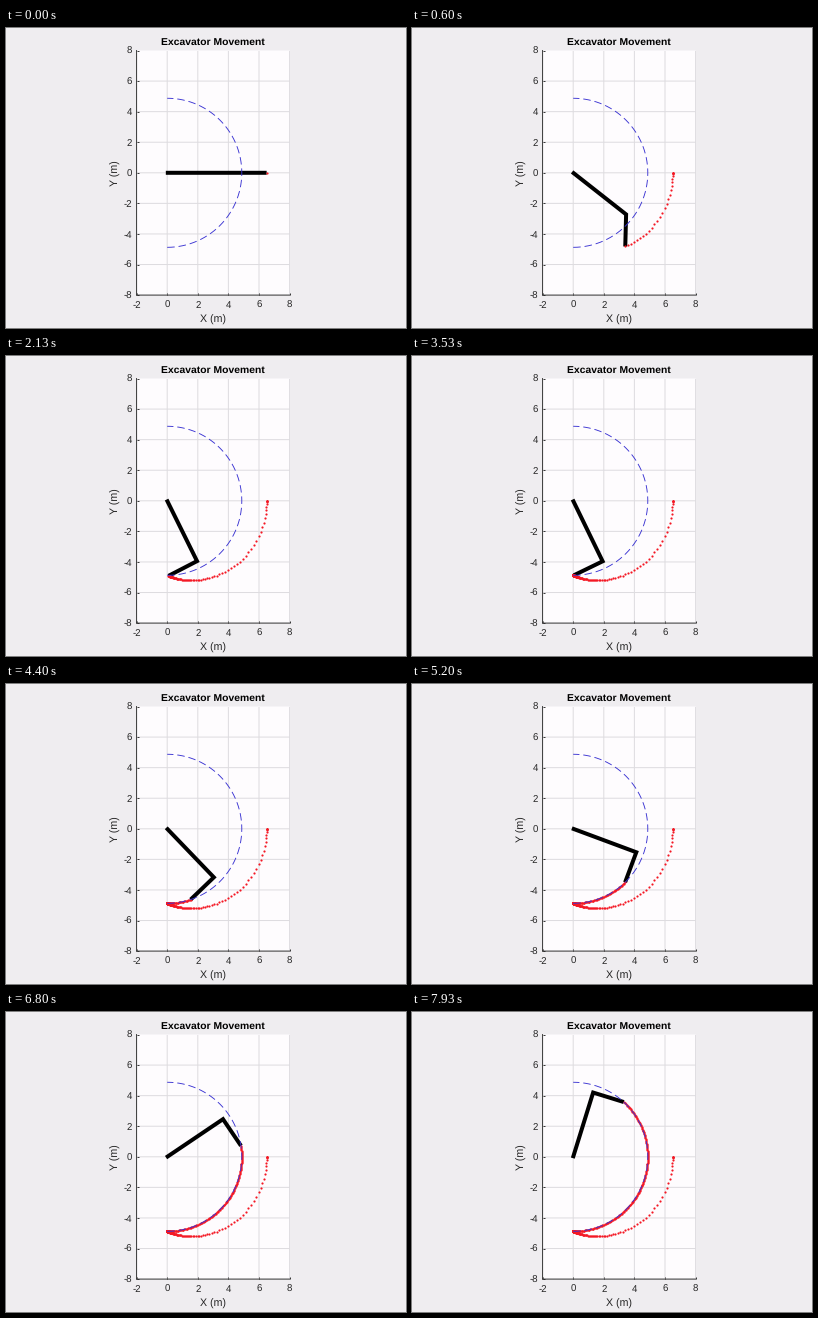
Write a matplotlib script that moves like this. It is 400 by 300 pixels and loops after 8000 ms.

```python
import numpy as np
import matplotlib.pyplot as plt
from matplotlib.animation import FuncAnimation

W, H, DPI = 400, 300, 100
POSES, LOOP_MS = 120, 8000
SUB = 3                                 # drawn frames per pose
BOOM, STICK = 4.4, 2.1                  # link lengths in metres
REACH = np.hypot(BOOM, STICK)           # tip radius with a square elbow
START = np.arctan2(STICK, BOOM) - np.pi / 2
SLOW, FAST = 6.5, 2.0                   # joint lag constants, in poses
STEP_AT, SWEEP_AT = 0.9, 50.3
SWEEP_RATE = np.radians(2.28)
DOTS_PER_POSE = 3
OVERHANG = 0.09 / BOOM                  # the boom starts a little behind its pivot
INK = "#262626"

plt.rcParams.update({"font.family": "Liberation Sans", "path.snap": False,
                     "text.hinting": "none"})


def px(n):
    """Pixels to points."""
    return n * 72 / DPI


def step(t):
    t = np.maximum(t, 0)
    return 1 - (SLOW * np.exp(-t / SLOW) - FAST * np.exp(-t / FAST)) / (SLOW - FAST)


def ramp(t):
    t = np.maximum(t, 0)
    decay = SLOW**2 * np.exp(-t / SLOW) - FAST**2 * np.exp(-t / FAST)
    return t - SLOW - FAST + decay / (SLOW - FAST)


def pose(t):
    """Elbow and tip positions at time t."""
    s = step(t - STEP_AT)
    boom = START * s + SWEEP_RATE * ramp(t - SWEEP_AT)
    stick = boom - np.pi / 2 * s
    ex, ey = BOOM * np.cos(boom), BOOM * np.sin(boom)
    return ex, ey, ex + STICK * np.cos(stick), ey + STICK * np.sin(stick)


fig = plt.figure(figsize=(W / DPI, H / DPI), dpi=DPI, facecolor="#efedf0")
ax = fig.add_axes([130.6 / W, (H - 267.1) / H, 153 / W, 244.6 / H],
                  facecolor="#fefcfe")
ax.set(xlim=(-2, 8), ylim=(-8, 8), xticks=range(-2, 9, 2), yticks=range(-8, 9, 2))
ax.set_xticklabels([str(v) for v in range(-2, 9, 2)])
ax.set_yticklabels([str(v) for v in range(-8, 9, 2)])
ax.set_axisbelow(True)
ax.grid(color="#dedce0", lw=px(1))
ax.tick_params(direction="in", length=px(2), width=px(0.9), color=INK,
               labelcolor=INK, labelsize=px(9.7), pad=px(4.5))
ax.tick_params(axis="x", pad=px(5.3))
for side in ("top", "right"):
    ax.spines[side].set_visible(False)
for side in ("left", "bottom"):
    ax.spines[side].set(color=INK, linewidth=px(0.9))


def label(x, y, text, size, **style):
    fig.text(x / W, 1 - y / H, text, fontsize=px(size), ha="center", va="center", **style)


label(207, 14, "Excavator Movement", 10.4, weight="bold", color="black")
label(207, 292, "X (m)", 10.6, color=INK)
label(110, 145, "Y (m)", 10.6, color=INK, rotation=90)

arm, = ax.plot([], [], color="black", lw=px(4), solid_capstyle="butt",
               solid_joinstyle="miter", zorder=3)
trail, = ax.plot([], [], ls="none", marker="o", ms=px(2.2), mew=0,
                 color="#f41824", zorder=4)
arc = np.linspace(-np.pi / 2, np.pi / 2, 181)
arc_w = px(0.9)
ax.plot(REACH * np.cos(arc), REACH * np.sin(arc), color="#3a33d2", lw=arc_w,
        dashes=(px(7.5) / arc_w, px(3.9) / arc_w), dash_capstyle="butt", zorder=5)


def draw(i):
    k = (i + 1) // SUB % POSES          # each pose comes in slightly early
    ex, ey, tx, ty = pose(k)
    arm.set_data([-OVERHANG * ex, ex, tx], [-OVERHANG * ey, ey, ty])
    times = np.arange(k * DOTS_PER_POSE + 1) / DOTS_PER_POSE
    trail.set_data(*pose(times)[2:])
    return arm, trail


FRAMES = POSES * SUB
anim = FuncAnimation(fig, draw, frames=FRAMES, interval=LOOP_MS / FRAMES,
                     repeat=True, repeat_delay=0)
plt.show()
```
